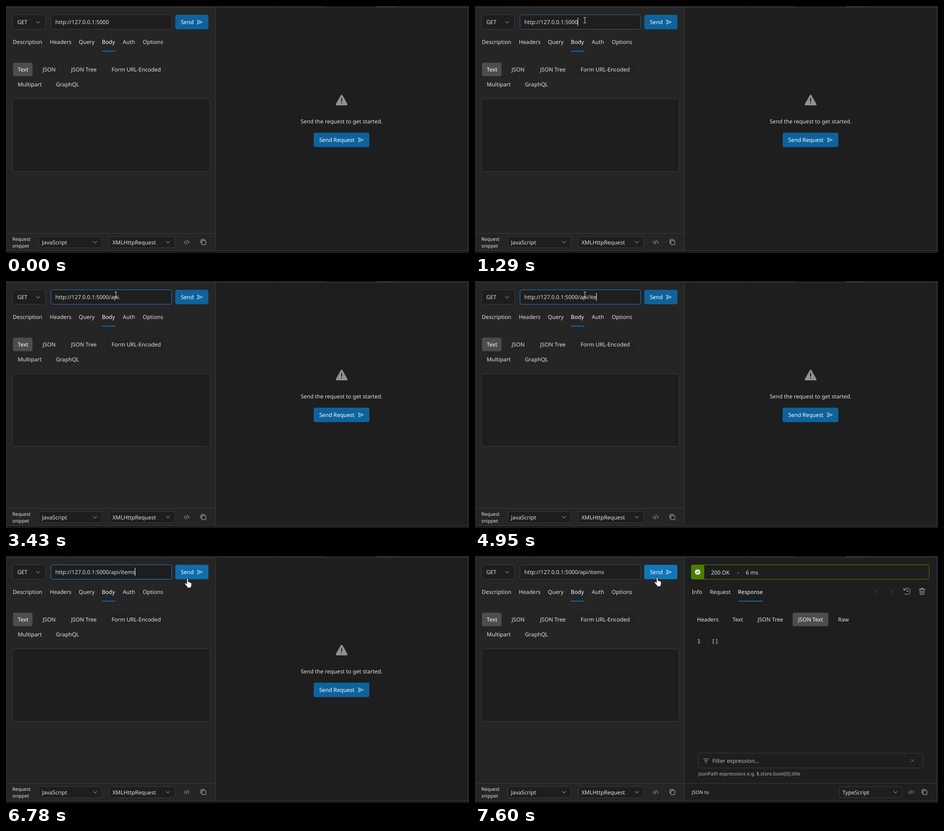
Animation, 1024 px wide and 547 px high, one loop 8000 ms. Source, as an HTML page:

```html
<!DOCTYPE html>
<html lang="en">
<head>
<meta charset="utf-8">
<title>Request panel</title>
<style>
html, body { margin: 0; width: 100%; height: 100%; overflow: hidden; background: #1e1e1e; }
svg { display: block; width: 1024px; height: 547px; }
text { font: 12.15px "Noto Sans", "Open Sans", sans-serif; fill: #e2e2e2; text-rendering: geometricPrecision; white-space: pre; }
.small { font-size: 10.55px; }
.mono { font: 12px "DejaVu Sans Mono", monospace; }
.on { fill: #fff; }
.dim { fill: #b8b8b8; }
.line { fill: none; stroke: #c8c8c8; stroke-linecap: round; stroke-linejoin: round; }
</style>
</head>
<body>
<svg id="stage" viewBox="0 0 1024 547" xmlns="http://www.w3.org/2000/svg"></svg>
<script>
const LOOP = 8000;
const BLUE = [14, 99, 156], BLUE_HOVER = [17, 119, 187];
const GREY = [60, 60, 60], FOCUS = [44, 122, 222];
const rgb = c => `rgb(${c.map(Math.round)})`;
const mix = (a, b, k) => rgb(a.map((v, i) => v + (b[i] - v) * k));

// Markup helpers
const rect = (x, y, w, h, fill, extra = '') =>
  `<rect x="${x}" y="${y}" width="${w}" height="${h}" fill="${fill}" ${extra}/>`;
const box = (x, y, w, h, extra = '') =>
  rect(x + .5, y + .5, w - 1, h - 1, '#1e1e1e', `rx="4" stroke="#3c3c3c" ${extra}`);
const pill = (x, y, w, h, fill, extra = '') =>
  rect(x + .4, y + .4, w - .8, h - .8, fill, `rx="4" ${extra}`);
const text = (x, y, s, cls = '', extra = '') =>
  `<text x="${x}" y="${y}" class="${cls}" ${extra}>${s}</text>`;
const tabs = (y, list) => list.map(([x, s, cls]) => text(x, y, s, cls)).join('');
const underline = (x, w) => rect(x, 99, w, 2, '#0e6db0');
const line = (d, extra = '') => `<path class="line" d="${d}" ${extra}/>`;
const chevron = (x, y) => line(`M${x - 4} ${y - 2}l4 4l4-4`);
const plane = (x, y) =>
  line(`M${x} ${y - 4.6}l11 4.6l-11 4.6l1.6-4.6zM${x + 1.6} ${y}h4.4`, 'style="stroke:#fff;stroke-width:.9"');
const code = x => line(`M${x - 3} 520l-3 3l3 3M${x + 3} 520l3 3l-3 3M${x + 1.2} 519l-2.4 8`);
const copy = x =>
  `<rect class="line" x="${x - 3.5}" y="519.5" width="9" height="9" rx="1.5"/>` +
  line(`M${x - 5.5} 525.5v-7q0-1.5 1.5-1.5h7`);
const select = (x, w, label) =>
  box(x, 510, w, 26) + text(x + 7.5, 527.5, label) + chevron(x + w - 16, 523);

const frame =
  rect(0, 0, 1024, 547, '#1e1e1e') +
  rect(0, 4, 463, 537, '#252526') +
  rect(0, 0, 1024, 3, '#252526') +
  [129, 351, 479, 595].map(x => rect(x, 0, 1, 3, '#1a1a1a')).join('') +
  rect(708, 0, 112, 3, '#181818') + rect(820, 0, 44, 3, '#2d2d2d') +
  rect(0, 3, 1024, 1, '#3a3a3a') +
  rect(463, 4, 1, 537, '#3c3c3c') +
  rect(1021, 4, 1, 537, '#3c3c3c') +
  rect(0, 541, 1024, 1, '#3f3f3f') + rect(0, 542, 1024, 5, '#1b1b1b') +
  rect(0, 503, 463, 1, '#3c3c3c');

const request =
  box(14, 19, 74, 33) + text(25, 39.8, 'GET') + chevron(71, 36) +
  box(99, 19, 268, 33, 'id="field"') + text(109, 39.8, '', '', 'id="url"') +
  rect(0, 26, 1, 18, '#fff', 'id="caret"') +
  pill(374, 19, 74, 33, rgb(BLUE), 'id="send"') +
  text(386.7, 39.8, 'Send', 'on') + plane(423.5, 35.7) +
  tabs(84.3, [[15, 'Description'], [97, 'Headers'], [161, 'Query'], [212, 'Body', 'on'],
    [258.3, 'Auth'], [302.5, 'Options']]) +
  underline(212, 30) +
  pill(15, 125, 44, 31, '#4d4d4d') +
  pill(221, 125, 134, 31, '#232324', 'id="hover"') +
  tabs(144.7, [[26, 'Text', 'on'], [81, 'JSON'], [144, 'JSON Tree'], [233.5, 'Form URL-Encoded']]) +
  tabs(178.3, [[26, 'Multipart'], [110.5, 'GraphQL']]) +
  box(14, 205, 438, 162) +
  text(14, 520.3, 'Request', 'small') + text(14, 534.8, 'snippet', 'small') +
  select(72, 141, 'JavaScript') + select(228, 146, 'XMLHttpRequest') +
  code(399.5) + copy(436.5);

const empty = '<g id="empty">' +
  '<path d="M742.3 198.5l11 19.5h-22z" fill="#919191" stroke="#919191" stroke-width="4" stroke-linejoin="round"/>' +
  '<path d="M742.3 204.5v6.5M742.3 215v.2" stroke="#1e1e1e" stroke-width="2.2" stroke-linecap="round"/>' +
  text(742.2, 260, 'Send the request to get started.', '', 'text-anchor="middle"') +
  pill(680, 280, 124, 33, rgb(BLUE)) +
  text(692.7, 301, 'Send Request', 'on') + plane(779.5, 296.5) + '</g>';

const response = '<g id="response">' +
  rect(478.5, 19.5, 526, 32, '#1e1e1e', 'rx="4" stroke="#487e02"') +
  '<path d="M507 19h-25q-4 0-4 4v25q0 4 4 4h25z" fill="#487e02"/>' +
  '<circle cx="492.5" cy="35.5" r="6" fill="#fff"/>' +
  line('M489.8 35.7l2 2l3.6-3.8', 'style="stroke:#487e02;stroke-width:1.5"') +
  text(522, 40.8, '200 OK') + text(580, 40.8, '-') + text(599, 40.8, '6 ms') +
  tabs(84.3, [[479.5, 'Info'], [519, 'Request'], [581.5, 'Response', 'on']]) +
  underline(582, 55) +
  line('M890 74l-4 4l4 4M920 74l4 4l-4 4', 'style="stroke:#666"') +
  line('M948.6 75.3a7.2 7.2 0 1 1 1.8 8.2M948.2 71.5v4h4M955.3 74v4.5h3.2') +
  line('M982.5 73.5h12.5M986.5 73.5v-2h4.5v2M984 73.5l.8 11.5h8l.8-11.5M987.3 76.5v5.5M990.2 76.5v5.5') +
  pill(702, 125, 80, 31, '#4d4d4d') +
  tabs(144.7, [[491, 'Headers'], [569.5, 'Text'], [625, 'JSON Tree'],
    [714.5, 'JSON Text', 'on'], [803, 'Raw']]) +
  text(742, 295, 'Loading...', '', 'id="loading" text-anchor="middle"') +
  '<g id="editor">' + text(491.5, 192.5, '1', 'mono') + text(523.5, 192.5, '[]', 'mono') + '</g>' +
  box(493, 436, 498, 34) +
  line('M505.5 449.5h11M507.5 453.5h7M509.5 457.5h3') +
  text(525, 457.8, 'Filter expression...', 'dim') +
  line('M964.5 450l7 7M971.5 450l-7 7', 'style="stroke:#777"') +
  text(494, 485.8, 'JsonPath expressions e.g. $.store.book[0].title', 'small dim') +
  rect(464, 503, 557, 1, '#3c3c3c') +
  text(479.5, 527, 'JSON to', 'small') +
  select(805, 141, 'TypeScript') + code(964.5) + copy(994) + '</g>';

const cursors =
  '<g id="cursor" stroke="#000" fill="#fff">' +
  '<path id="arrow" stroke-width=".9" d="M.3 .3v16l3.7-3.5l2.5 5.8l2.4-1l-2.5-5.6h5z"/>' +
  '<path id="hand" stroke-width="1" d="M-1.2 1.6a1.6 1.6 0 0 1 3.2 0v5.6q2.3-.6 2.6.9q2.2-.5 2.5 1q2.1-.2 2.3 1.6v4q0 2-1.4 3.6v2.5h-8v-2l-5.2-6.2q-1.3-2.3.4-2.8q1.5-.3 3.6 2z"/>' +
  '<path id="beam" fill="none" stroke="#e4e4e4" d="M-3-5.5h2.5l.5.5l.5-.5h2.5M0-5v11M-3 6.5h2.5l.5-.5l.5.5h2.5"/>' +
  '</g>';

const stage = document.getElementById('stage');
stage.innerHTML = frame + request + empty + response + cursors;
const el = {};
stage.querySelectorAll('[id]').forEach(n => el[n.id] = n);

// Pointer stops: time, x, y, shape
const stops = [
  [390, 719, 471, 'arrow'], [460, 640, 402, 'arrow'], [530, 531, 307, 'arrow'],
  [600, 424, 214, 'beam'], [670, 344, 143, 'hand'], [740, 291, 99, 'arrow'],
  [810, 263, 71, 'hand'], [880, 241, 61, 'arrow'], [950, 242, 38, 'beam'],
  [1020, 243, 31, 'beam'], [1820, 243, 30, 'beam'],
  [6020, 266, 34, 'beam'], [6090, 326, 48, 'beam'], [6160, 376, 61, 'arrow'],
  [6230, 392, 62, 'arrow'], [6290, 395, 62, 'arrow'], [6360, 395, 60, 'arrow'],
  [6430, 396, 58, 'arrow'], [6570, 398, 55, 'arrow'], [6640, 400, 51, 'hand'],
  [6780, 401, 50, 'hand'], [6850, 402, 48, 'hand'], [6930, 402.5, 47, 'hand']
];

// Typed path and caret: time, text, caret shown
const typing = [
  [0, '', 0], [1220, '', 1], [1690, '', 0], [2160, '/', 1], [2490, '/a', 1],
  [2560, '/ap', 1], [2630, '/api', 1], [2900, '/api.', 1], [3430, '/api.', 0],
  [3490, '/api', 1], [3690, '/api/', 1], [3960, '/api/i', 1], [4490, '/api/i', 0],
  [4820, '/api/it', 1], [4950, '/api/ite', 1], [5150, '/api/item', 1],
  [5290, '/api/items', 1], [5820, '/api/items', 0], [6360, '/api/items', 1],
  [6850, '/api/items', 0]
];

const latest = (list, t) => list.filter(s => s[0] <= t).pop();
// Fade that advances in n even jumps
const fade = (t, start, end, n) =>
  t < start ? 0 : Math.min(1, (1 + Math.floor((t - start) / (end - start) * (n - 1))) / n);
const show = (node, on) => node.style.display = on ? '' : 'none';

function draw(t) {
  const [, typed, caret] = latest(typing, t);
  el.url.textContent = 'http://127.0.0.1:5000' + typed;
  el.caret.setAttribute('x', Math.round(108.5 + el.url.getComputedTextLength()));
  show(el.caret, caret);

  const focus = fade(t, 1220, 1420, 4) - fade(t, 7130, 7330, 4);
  el.field.setAttribute('stroke', mix(GREY, FOCUS, focus));
  el.send.setAttribute('fill', mix(BLUE, BLUE_HOVER, fade(t, 6640, 6930, 4)));
  show(el.hover, t >= 670);

  const sent = t >= 7200;
  show(el.empty, !sent);
  show(el.response, sent);
  show(el.loading, t < 7600);
  show(el.editor, t >= 7600);

  const stop = latest(stops, t);
  show(el.cursor, stop);
  if (stop) {
    el.cursor.setAttribute('transform', `translate(${stop[1]} ${stop[2]})`);
    for (const shape of ['arrow', 'hand', 'beam']) show(el[shape], shape === stop[3]);
  }
}

const begin = performance.now();
function tick() {
  draw((performance.now() - begin) % LOOP);
  requestAnimationFrame(tick);
}
tick();
</script>
</body>
</html>
```
